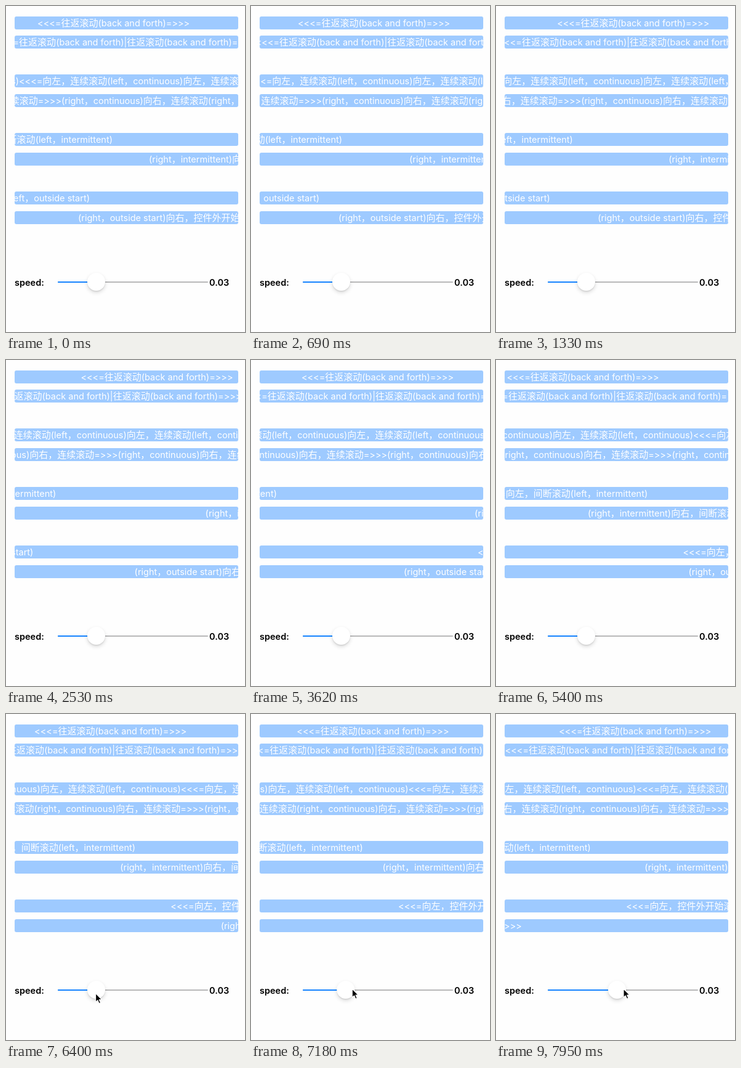
These frames come from a looping animation (388x529 px, 8000 ms). An HTML page:

```html
<!DOCTYPE html>
<html lang="zh">
<head>
<meta charset="utf-8">
<title>Marquee labels</title>
<style>
html, body { margin: 0; width: 100%; height: 100%; overflow: hidden; background: #fefefe; }
#stage { position: relative; width: 388px; height: 529px; overflow: hidden; font-family: Inter, "Noto Sans CJK SC", "Noto Sans CJK", sans-serif; }
#stage > * { position: absolute; }
.bar { left: 14px; width: 363px; height: 21px; border-radius: 3px; overflow: hidden; background: #9ecaff; }
.bar span { position: absolute; left: 0; top: 0; white-space: pre; color: #fff; font-size: 14.5px; line-height: 21px; font-variant-ligatures: none; font-feature-settings: "calt" 0; }
.bar i { font: normal 15px/0 "Noto Sans CJK SC", "Noto Sans CJK", sans-serif; }
.label { top: 438px; font-size: 14.5px; font-weight: 600; line-height: 21px; color: #000; white-space: pre; }
.track { left: 84px; top: 446.7px; height: 2.6px; border-radius: 1.3px; }
#knob { left: -14.5px; top: 433px; width: 29px; height: 29px; border-radius: 50%; background: #fff; box-shadow: 0 3px 6px rgba(0,0,0,.15), 0 2px 1px rgba(0,0,0,.06); }
#cursor { left: 0; top: 0; overflow: visible; }
</style>
</head>
<body>
<div id="stage">
  <div class="label" style="left:14px">speed:</div>
  <div class="track" style="width:244px;background:#b8b8b9"></div>
  <div class="track" id="fill" style="background:#1583ff"></div>
  <div id="knob"></div>
  <div class="label" style="left:330px">0.03</div>
  <svg id="cursor" width="13" height="20">
    <path d="M0 0V14L3.3 11L5.5 16.3L7.9 15.2L5.7 10.1H10Z" fill="#000" stroke="#fff" stroke-width="1.1" stroke-linejoin="round"/>
  </svg>
</div>
<script>
const LOOP = 8000, SPEED = 0.0362, VIEW = 363;
const stage = document.getElementById('stage');
const fill = document.getElementById('fill');
const knob = document.getElementById('knob');
const cursor = document.getElementById('cursor');

const mod = (a, n) => ((a % n) + n) % n;

function bounce(lo, hi, start, d) {
  const span = hi - lo, u = mod(start - lo + d, 2 * span);
  return lo + (u < span ? u : 2 * span - u);
}

const forth = '往返滚动(back and forth)';
const left = '向左，连续滚动(left，continuous)';
const right = '(right，continuous)向右，连续滚动';

// x(d, w): text offset within the bar after travelling d, for text width w
const rows = [
  { slot: 0, text: `<<<=${forth}=>>>`, x: d => bounce(-0.3, 118, 37, d) },
  { slot: 1, text: `<<<=${forth}|${forth}=>>>`, x: d => bounce(-59.5, 3.2, -31.3, d) },
  { slot: 3, text: `<<<=${left}${left}`, copies: 2, x: (d, w) => -mod(d - 7, w) },
  { slot: 4, text: `${right}${right}=>>>`, copies: 2, x: (d, w) => mod(76 + d, w) - w },
  { slot: 6, text: '<<<=向左，间断滚动(left，intermittent)', x: (d, w) => -mod(w - 159 + d, w) },
  { slot: 7, text: '(right，intermittent)向右，间断滚动=>>>', x: (d, w) => VIEW - w + mod(w - 145 + d, w) },
  { slot: 9, text: '<<<=向左，控件外开始滚动(left，outside start)', x: (d, w) => VIEW - mod(w + VIEW - 122 + d, w + VIEW) },
  { slot: 10, text: '(right，outside start)向右，控件外开始滚动=>>>', x: (d, w) => mod(w + 103 + d, w + VIEW) - w }
];

for (const row of rows) {
  const bar = document.createElement('div');
  bar.className = 'bar';
  bar.style.top = 16.5 + 31.6 * row.slot + 'px';
  row.el = document.createElement('span');
  const copies = row.copies || 1;
  row.el.innerHTML = row.text.repeat(copies)
    .replace(/</g, '&lt;')
    .replace(/[\u3000-\uffef]+/g, '<i>$&</i>');
  bar.append(row.el);
  stage.prepend(bar);
  row.width = row.el.getBoundingClientRect().width / copies;
}

// Pointer path: time, x, y
const GRAB = 7050;
const path = [[5750, 150, 529], [6300, 145, 454], [6800, 148, 451], [GRAB, 157, 446], [7950, 207, 446], [8000, 208, 446]];

function pointAt(t) {
  const i = Math.max(1, path.findIndex(p => p[0] >= t));
  const [a, b] = [path[i - 1], path[i]];
  const k = Math.max(0, (t - a[0]) / (b[0] - a[0]));
  return [a[1] + (b[1] - a[1]) * k, a[2] + (b[2] - a[2]) * k];
}

function draw(t) {
  for (const { el, x, width } of rows) {
    el.style.transform = `translateX(${x(t * SPEED, width)}px)`;
  }
  const [px, py] = pointAt(t);
  const value = 146 + (t > GRAB ? px - 157 : 0);
  knob.style.transform = `translateX(${value}px)`;
  fill.style.width = value - 84 + 'px';
  cursor.style.visibility = t < path[0][0] ? 'hidden' : 'visible';
  cursor.style.transform = `translate(${px}px, ${py}px)`;
}

const begin = performance.now();
function tick() {
  draw((performance.now() - begin) % LOOP);
  requestAnimationFrame(tick);
}
tick();
</script>
</body>
</html>
```
